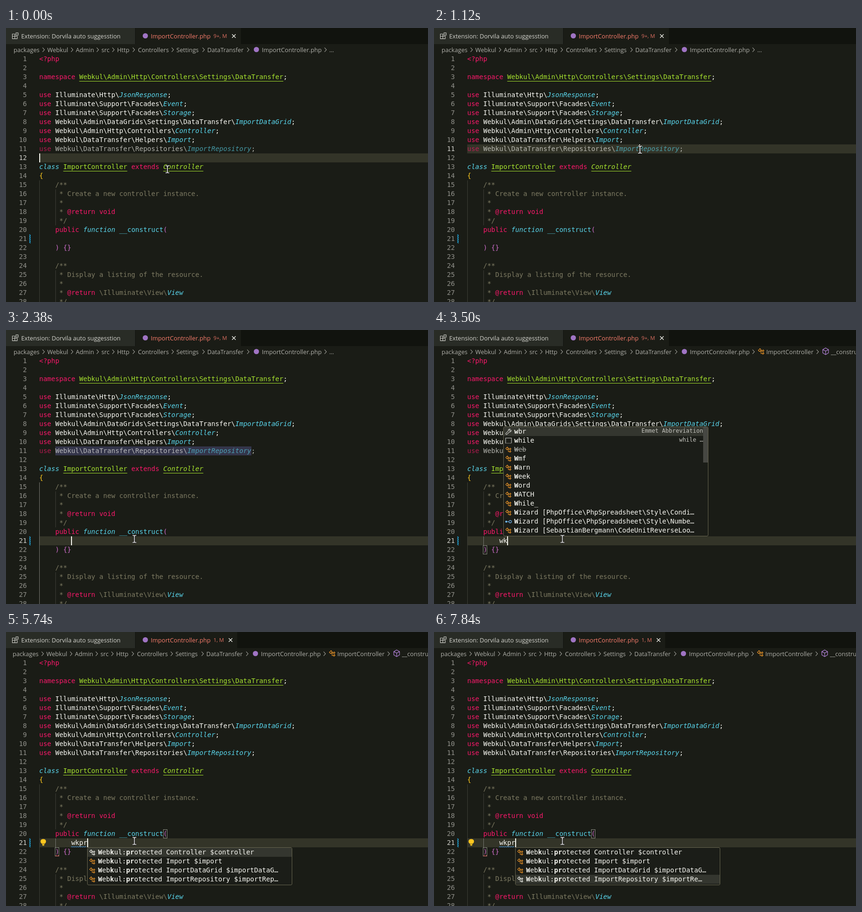
Write an HTML page that moves like this. It is 889 by 579 pixels and loops after 8000 ms.

```html
<!DOCTYPE html>
<html lang="en">
<head>
<meta charset="utf-8">
<title>Editor auto suggestion</title>
<style>
html, body { margin: 0; width: 100%; height: 100%; overflow: hidden; background: #1a1c16; }
#stage { position: absolute; left: 0; top: 0; width: 889px; height: 579px; overflow: hidden; background: #1a1c16; color: #f8f8f2; }
#stage div, #stage svg { position: absolute; }
svg { overflow: visible; fill: none; }
.mono { font: 14px/19px "DejaVu Sans Mono", monospace; white-space: pre; }
.ui { font: 12.65px/20px "Open Sans", "Noto Sans", sans-serif; white-space: pre; }
.num { left: 0; width: 44px; text-align: right; color: #90908a; }
k { color: #f9186a; }
t { color: #59d4ea; font-style: italic; }
f { color: #59d4ea; }
d { color: #a6e22e; text-decoration: underline; text-underline-position: under; }
c { color: #7d7a62; }
y { color: #ffcb1f; }
o { color: #cb6cc8; }
m { font-weight: bold; }
.old { opacity: .6; text-decoration: line-through; }
.popup { box-sizing: border-box; background: #1b1d18; border: 1px solid #66644f; border-radius: 3px; overflow: hidden; }
.detail { font-size: 12px; color: #c4c4be; text-align: right; right: 10px; }
.match { box-sizing: border-box; border: 1px solid #888880; }
</style>
</head>
<body>
<div id="stage"></div>
<script>
const LOOP = 8000, CH = 8.428, ROW = 19;
const stage = document.getElementById('stage');
const colX = n => 70 + n * CH;
const lineY = n => 56 + ROW * (n - 1);

function add(parent, css, html = '', cls = '') {
  const el = document.createElement('div');
  el.style.cssText = css;
  el.className = cls;
  el.innerHTML = html;
  parent.append(el);
  return el;
}
const box = (x, y, w, h, css = '', cls = '', parent = stage) =>
  add(parent, `left:${x}px;top:${y}px;width:${w}px;height:${h}px;${css}`, '', cls);
const text = (html, x, y, css = '', cls = 'mono', parent = stage) =>
  add(parent, `left:${x}px;top:${y}px;${css}`, html, cls);
const label = (s, x, mid, color, parent = stage, css = '') =>
  text(s, x, mid - 10, `color:${color};${css}`, 'ui', parent);
const svg = (x, y, size, body, parent = stage, color = '#f8f8f2') =>
  text(`<svg width="${size}" height="${size}" viewBox="0 0 16 16" stroke="currentColor" stroke-width="1.2">${body}</svg>`,
    x, y, `color:${color};width:${size}px;height:${size}px`, '', parent);

// Hard changes: table of [ms, value]
function step(el, prop, table) {
  const keys = table.map(([t, v]) => ({ offset: t / LOOP, [prop]: v, easing: 'step-end' }));
  keys.push({ offset: 1, [prop]: table.at(-1)[1] });
  el.animate(keys, { duration: LOOP, iterations: Infinity });
}
function show(el, from, to = LOOP, on = 1, off = 0) {
  const table = from ? [[0, off], [from, on]] : [[0, on]];
  if (to < LOOP) table.push([to, off]);
  step(el, 'opacity', table);
}

const ICON = {
  cls: '<path d="M5 1.5 1.3 5.2l3 3L8 4.5zM6 6.5h4M7.4 6.5v6h2.6M12.2 4.2l-2.2 2.2 1.8 1.8L14 6zM12.2 10.2 10 12.4l1.8 1.8L14 12z"/>',
  cube: '<path d="M8 1 14 4.3v7.2L8 15 2 11.5V4.3zM2 4.3l6 3.2 6-3.2M8 7.5V15"/>',
  wrench: '<path d="M14.3 4.2 11.8 6.6 9.5 4.4 12 1.8C9.5.8 6.7 2.6 7.3 6L1.6 11.8c-1.2 1.6.9 3.7 2.5 2.5L10 8.6c3 .7 5.1-1.7 4.3-4.4z"/>',
  snippet: '<path d="M1 14V1.5h14V14"/><path d="M1 14h14" stroke-dasharray="2 1.6"/>',
  face: '<circle cx="12" cy="8" r="3"/><path d="M9 8H4"/><circle cx="2.6" cy="8" r="1.8" fill="currentColor"/>',
  ext: '<path d="M1.5 4h5.5v5h5.5v5.5h-11zM1.5 9H7v5.5M9.5 1.5h5v5h-5z"/>',
  close: '<path d="M3 3 13 13M13 3 3 13" stroke-width="1.7"/>',
  bulb: '<path d="M8 1C1.5 1 1 7.5 5 10.5h6C15 7.5 14.5 1 8 1z" fill="currentColor"/><path d="M5.5 12.5h5M6 14.5h4" stroke-width="1.8"/>'
};
const ORANGE = '#ee9628', PURPLE = '#a074c4';
const dot = (x, y, parent) => box(x - 5.5, y - 5.5, 11, 11, `background:${PURPLE};border-radius:50%`, '', parent);

// Tabs
box(0, 0, 889, 34, 'background:#11130e');
box(0, 0, 272, 34, 'background:#292c26');
const tab = box(273, 0, 222, 34, 'background:#1a1c16');
step(tab, 'width', [[0, '222px'], [4200, '214px']]);
svg(12, 9, 15, ICON.ext, stage, '#c8c8c2');
label('Extension: Dorvila auto suggesstion', 32, 16.5, '#d2d2cc');
dot(293, 16.5);
label('ImportController.php', 305, 16.5, '#f87d6c');
const badge = s => label(s, 437, 17, '#dc6f61', stage, 'font-size:11.2px');
show(badge('9+, M'), 0, 4200);
show(badge('1, M'), 4200);
const close = svg(474, 11, 12, ICON.close);
step(close, 'transform', [[0, 'none'], [4200, 'translateX(-7px)']]);

// Breadcrumbs
const crumbs = box(0, 34, 889, 21);
const CRUMB = '#afafa9';
const chevron = (x, parent) =>
  text(`<svg width="6" height="10"><path d="M1 .5 5 5 1 9.5" stroke="${CRUMB}" stroke-width="1.1"/></svg>`, x - 3, 6.5, '', '', parent);
[['packages', 16], ['Webkul', 87], ['Admin', 147], ['src', 201], ['Http', 234], ['Controllers', 278],
 ['Settings', 359], ['DataTransfer', 424], ['ImportController.php', 539]]
  .forEach(([s, x]) => label(s, x, 11.5, CRUMB, crumbs));
[79, 139, 193, 226, 269, 351, 416, 510, 673].forEach(x => chevron(x, crumbs));
dot(527, 11.5, crumbs);
show(label('…', 681, 11.5, CRUMB, crumbs), 0, 2520);
const deep = box(0, 0, 889, 21, '', '', crumbs);
svg(682, 4, 15, ICON.cls, deep, ORANGE);
label('ImportController', 700, 11.5, CRUMB, deep);
chevron(808, deep);
svg(817, 3, 16, ICON.cube, deep, '#b180d7');
label('__construct', 836, 11.5, CRUMB, deep);
show(deep, 2520);
step(crumbs, 'transform', [[0, 'none'], [5040, 'translateX(-2px)']]);

// Current line and symbol highlight
const bar = box(70, 0, 819, ROW, 'background:#333428');
step(bar, 'top', [[0, lineY(12) + 'px'], [910, lineY(11) + 'px'], [2380, lineY(21) + 'px']]);
show(box(colX(4), lineY(11), 49 * CH, ROW, 'background:rgba(74,74,118,.55)'), 1190, 2450);

// Indent guides
const guide = (col, from, to, color = '#3c3d36') =>
  box(Math.round(colX(col)), lineY(from), 1, ROW * (to - from + 1), `background:${color}`);
guide(0, 15, 28);
guide(4, 16, 19);
guide(4, 25, 28);
show(guide(0, 15, 28, '#767771'), 2380, 3360);
show(guide(4, 21, 21, '#767771'), 3360);

// Code
const code = String.raw`<k>&lt;?php</k>

<k>namespace</k> <d>Webkul\Admin\Http\Controllers\Settings\DataTransfer</d>;

<k>use</k> Illuminate\Http\<t>JsonResponse</t>;
<k>use</k> Illuminate\Support\Facades\<t>Event</t>;
<k>use</k> Illuminate\Support\Facades\<t>Storage</t>;
<k>use</k> Webkul\Admin\DataGrids\Settings\DataTransfer\<t>ImportDataGrid</t>;
<k>use</k> Webkul\Admin\Http\Controllers\<t>Controller</t>;
<k>use</k> Webkul\DataTransfer\Helpers\<t>Import</t>;
<k>use</k> Webkul\DataTransfer\Repositories\<t>ImportRepository</t>;

<t>class</t> <d>ImportController</d> <k>extends</k> <d><i>Controller</i></d>
<y>{</y>
    <c>/**</c>
     <c>* Create a new controller instance.</c>
     <c>*</c>
     <c>* <k>@return void</k></c>
     <c>*/</c>
    <k>public</k> <t>function</t> <f>__construct</f><o>(</o>

    <o>)</o> <o>{}</o>

    <c>/**</c>
     <c>* Display a listing of the resource.</c>
     <c>*</c>
     <c>* <k>@return</k> \Illuminate\View\<t>View</t></c>
     <c>*/</c>`.split('\n');

const DIM = '#90908a', LIT = '#d0d0ca';
const active = {
  11: [[0, DIM], [910, LIT], [2380, DIM]],
  12: [[0, LIT], [910, DIM]],
  21: [[0, DIM], [2380, LIT]]
};
code.forEach((html, i) => {
  const n = i + 1;
  const num = add(stage, `top:${lineY(n)}px`, n, 'mono num');
  if (active[n]) step(num, 'color', active[n]);
  const line = text(html, 70, lineY(n));
  if (n === 11) show(line, 3990, LOOP, 1, .667);
});

// Modified-line mark
box(49, lineY(21), 3, ROW, 'background:repeating-linear-gradient(-45deg,#1f93c0 0 1.6px,#1a1c16 1.6px 2.8px)');

// Typing
[['w', 3360], ['k', 3500], ['p', 4690], ['r', 4760]].forEach(([ch, t], i) =>
  show(text(ch, colX(8 + i), lineY(21)), t));

// Bracket pair, squiggles, bulb
const bracket = (col, line) => box(Math.floor(colX(col)), lineY(line), 9, ROW, '', 'match');
show(bracket(31, 20), 2450);
show(bracket(4, 22), 2450);
const squiggle = (col, line, count, color) =>
  text(`<svg width="${count * CH}" height="4"><path d="M0 3${'l2-2 2 2'.repeat(Math.round(count * CH / 4))}" stroke="${color}"/></svg>`,
    colX(col), lineY(line) + 16, '', '');
show(squiggle(4, 22, 1, '#f14c4c'), 3990);
show(squiggle(8, 21, 4, '#3f9bf0'), 5040);
show(svg(71, lineY(21) + 1, 15, ICON.bulb, stage, '#ffc71f'), 5040);

// Suggestions for "w"
const first = box(146, 204, 432, 232, '', 'popup');
box(0, 0, 430, ROW, 'background:#34362f', '', first);
[['wrench', '<m>w</m>br', LIT, 'Emmet Abbreviation'],
 ['snippet', '<m>w</m>hile', LIT, 'while …'],
 ['cls', '<span class="old"><m>W</m>eb</span>'],
 ...['mf', 'arn', 'eek', 'ord', 'ATCH', 'hile_', String.raw`izard [PhpOffice\PhpSpreadsheet\Style\Condi…`]
   .map(s => ['cls', '<m>W</m>' + s]),
 ['face', String.raw`<m>W</m>izard [PhpOffice\PhpSpreadsheet\Style\Numbe…`, '#75beff'],
 ['cls', String.raw`<m>W</m>izard [SebastianBergmann\CodeUnitReverseLoo…`]
].forEach(([icon, html, color = ORANGE, detail], i) => {
  svg(3, i * ROW + 3, 14, ICON[icon], first, color);
  text(html, 22, i * ROW, '', 'mono', first);
  if (detail) add(first, `top:${i * ROW - 1}px`, detail, 'mono detail');
});
box(420, 0, 10, 75, 'background:#464742', '', first);
show(first, 3430, 3640);

// Suggestions for "wkpr"
const second = box(171, 455, 432, 80, '', 'popup');
const PRE = '<m>W</m>eb<m>k</m>ul:<m>pr</m>otected ';
const picks = [4830, 6300, 6440, 7140, LOOP];
const mark = box(0, 0, 430, ROW, 'background:#34362f', '', second);
step(mark, 'top', [0, ...picks.slice(1, 4)].map((t, i) => [t, i * ROW + 'px']));
[['Controller $controller'], ['Import $import'],
 ['ImportDataGrid $importDataG…', 'ImportDataGrid $importData…'],
 ['ImportRepository $importRep…', 'ImportRepository $importRe…']
].forEach(([plain, chosen = plain], i) => {
  const item = (s, color) => {
    const el = box(0, i * ROW, 430, ROW, '', '', second);
    svg(3, 3, 14, ICON.cls, el, color);
    text(PRE + s, 22, 0, '', 'mono', el);
    return el;
  };
  show(item(plain, ORANGE), picks[i], picks[i + 1], 0, 1);
  show(item(chosen, '#f8f8f2'), picks[i], picks[i + 1]);
});
show(second, 4830);

// Caret
const caret = box(0, 0, 2, ROW, 'background:#f8f8f0');
step(caret, 'transform', [[0, 0, 12], [910, 43, 11], [2380, 8, 21], [3360, 9, 21], [3500, 10, 21], [4690, 11, 21], [4760, 12, 21]]
  .map(([t, col, line]) => [t, `translate(${Math.floor(colX(col))}px,${lineY(line)}px)`]));
step(caret, 'opacity', [0, 280, 770, 1400, 1890, 2870, 3360, 3990, 4550, 5180, 5740, 6230, 6790, 7350, 7840]
  .map((t, i) => [t, 1 - i % 2]));

// Pointer
const beam = 'M-4-7.5h2.5L0-6.5 1.5-7.5H4M0-6.5v13M-4 7.5h2.5L0 6.5 1.5 7.5H4';
const pointer = text(`<svg width="1" height="1"><path d="${beam}" stroke="#000" stroke-width="3.6"/><path d="${beam}" stroke="#fff" stroke-width="1.6"/></svg>`, 0, 0, '', '');
pointer.animate([[0, 340, 298.5], [70, 340, 298.5], [210, 318, 370], [350, 300, 440], [420, 300, 470], [560, 370, 375],
  [770, 434, 257], [1190, 434, 257], [1680, 430, 284], [1960, 350, 370], [2240, 271, 441.5], [2310, 270.5, 441.5], [LOOP, 270.5, 441.5]]
  .map(([t, x, y]) => ({ offset: t / LOOP, transform: `translate(${x}px,${y}px)` })),
  { duration: LOOP, iterations: Infinity });
</script>
</body>
</html>
```
